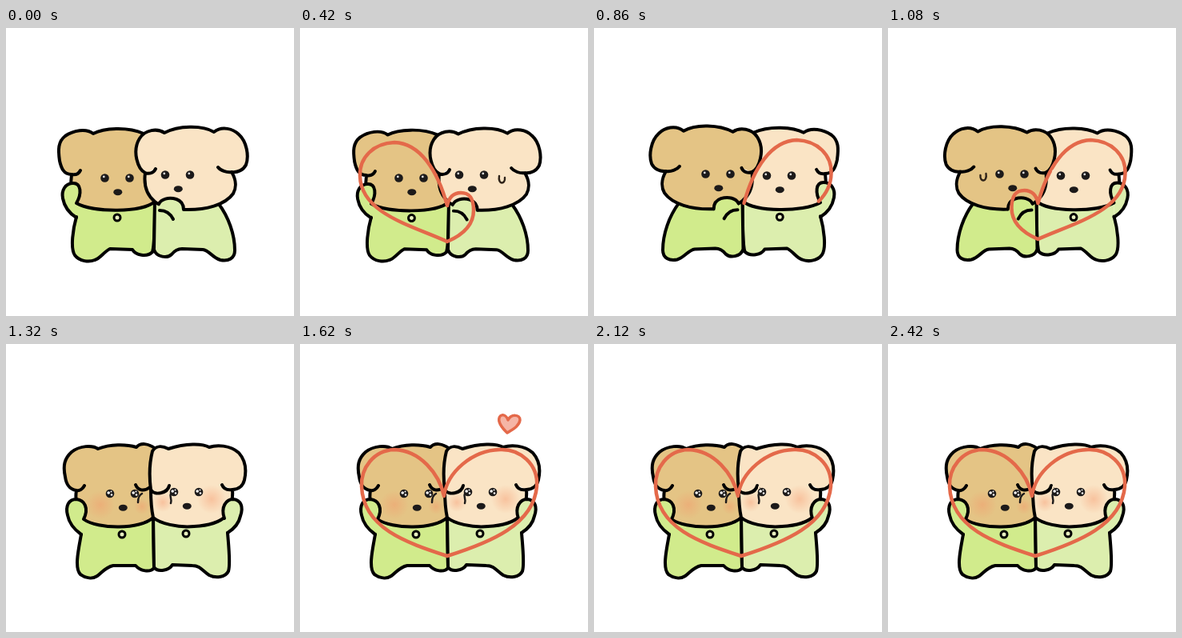
These frames come from a looping animation (360 by 360 pixels, 2520 ms). An HTML page:

```html
<!DOCTYPE html>
<html lang="en">
<head>
<meta charset="utf-8">
<title>Two puppies and a heart</title>
<style>
html, body { margin: 0; width: 100%; height: 100%; overflow: hidden; background: #fff; }
svg { display: block; width: 100vw; height: 100vh; }
</style>
</head>
<body>
<svg viewBox="0 0 360 360">
  <defs>
    <filter id="rough" filterUnits="userSpaceOnUse" x="0" y="0" width="360" height="360" color-interpolation-filters="sRGB">
      <feTurbulence id="noise" type="fractalNoise" baseFrequency=".07" numOctaves="1" seed="1"/>
      <feDisplacementMap in="SourceGraphic" scale="1.5" xChannelSelector="R" yChannelSelector="G"/>
    </filter>
    <radialGradient id="blush">
      <stop offset="0" stop-color="#f59468" stop-opacity=".42"/>
      <stop offset="1" stop-color="#f59468" stop-opacity="0"/>
    </radialGradient>
  </defs>
  <g id="scene" filter="url(#rough)" stroke-linecap="round" stroke-linejoin="round"></g>
</svg>
<script>
const scene = document.getElementById('scene');
const noise = document.getElementById('noise');
const RED = '#e4694a';
const brown = { fur: '#e4c485', suit: '#d1eb8c' };
const cream = { fur: '#fae4c5', suit: '#dceeae' };

// Step lengths in ms, one list per pose
const poses = [
  [100, 120, 100, 100, 120, 120],
  [100, 100, 100, 120, 120],
  [100, 100, 100, 120, ...Array(9).fill(100)]
];
const LOOP = poses.flat().reduce((a, b) => a + b);

const path = (d, fill = 'none', stroke = '#000', width = 4) =>
  `<path d="${d}" fill="${fill}" stroke="${stroke}" stroke-width="${width}"/>`;
const dot = (x, y, r, fill) => `<circle cx="${x}" cy="${y}" r="${r}" fill="${fill}"/>`;
const button = (x, y) => `<circle cx="${x}" cy="${y}" r="4" fill="#e8f0c0" stroke="#000" stroke-width="3"/>`;
const blush = (x, y, r) => dot(x, y, r, 'url(#blush)');
const drawn = step => Math.min(1, Math.max(0, (step - 1) / 2));

function face(x, y, shiny) {
  const eye = ex => dot(ex, y, 5.3, '#1c1a1a') + (shiny
    ? dot(ex - 1.8, y - 1, 1.8, '#fff') + dot(ex + 2, y + 1.5, 1.3, '#fff') + dot(ex + 1.5, y - 2.4, 1, '#fff')
    : dot(ex - 1.2, y - 1.6, 1.4, '#ddd'));
  return eye(x - 15.5) + eye(x + 15.5) +
    `<ellipse cx="${x + .8}" cy="${y + 17.7}" rx="5.5" ry="4" fill="#1c1a1a"/>`;
}

function heart(d, part) {
  return part ? `<path d="${d}" pathLength="1" stroke-dasharray="${part} 2" fill="none" stroke="${RED}" stroke-width="4.5"/>` : '';
}

// One dog waves behind, the other holds a paw to its chin in front
function huddle(back, front, step) {
  const s = 1 - Math.min(step, 4) * .0025;
  return `<g transform="translate(185 292) scale(${s}) translate(-185 -292)">` +
    path('M88 236C84 250 80 275 86 284C92 292 104 293 111 290C118 288 122 280 130 276L158 277C162 284 176 287 183 280C186 270 186 240 186 215L88 215', back.suit) +
    path('M186 217C170 231 110 231 88 219C82 210 80 195 82 183C72 183 69 175 67 166C65 152 65 142 74 135C84 128 100 125 109 132C122 125 152 123 172 132M82 183C87 184 91 182 93 178', back.fur) +
    path('M88 219C95 207 94 194 84 194C74 194 69 203 71 213C73 224 80 232 88 237', back.suit) +
    button(139, 237) +
    path('M186 215L185 277C188 287 202 288 207 283C211 278 215 276 220 276L246 277C254 278 258 287 268 290C278 292 286 288 286 278C286 258 278 236 266 220', front.suit) +
    path('M186 217C175 208 172 196 174 181C165 177 157 154 167 138C174 127 189 125 198 131C215 122 245 121 260 130C270 122 284 126 291 133C301 142 304 160 300 171C297 177 290 181 282 180C288 190 288 200 284 207C274 221 250 228 222 227C205 226 192 222 186 217ZM174 181C179 183 185 181 187 176M282 180C276 181 268 178 265 174', front.fur) +
    path('M191 220C194 214 203 211 213 214C220 216 223 222 222 229L205 234L192 226Z', front.suit, 'none') +
    path('M191 220C194 214 203 211 213 214C219 216 222 221 222 227M192 228C200 228 206 233 209 239') +
    '</g>';
}

function lopsided(step) {
  return (step > 2 ? path('M249 185C247 196 257 196 256 187', 'none', '#2e2218', 2.4) : '') +
    heart('M184 222C172 178 150 144 118 143C92 144 74 162 75 185C76 232 140 247 184 267C205 258 217 245 217 228C217 210 210 206 201 206C192 206 186 212 184 222', drawn(step));
}

function bothWave(step) {
  const rise = Math.max(4 - step, -1) * 10;
  return path('M94 238C91 255 85 280 93 288C100 293 108 294 114 290C120 286 124 279 134 277L162 277C168 284 180 286 185 280L184 215L94 215', brown.suit) +
    path('M277 236C278 250 281 275 278 284C274 292 262 293 254 289C246 284 243 277 233 277L208 276C204 283 190 286 185 279L184 215L274 215', cream.suit) +
    path('M184 217C168 232 115 232 97 219C89 210 86 195 88 183C79 182 75 174 74 166C71 152 73 143 82 135C92 127 108 126 115 131C130 125 150 125 163 129C168 123 178 124 187 131M88 183C92 184 96 181 98 177', brown.fur) +
    path('M162 176C165 183 172 185 180 179') +
    path('M184 217C192 224 215 230 235 228C255 227 268 222 275 215C281 208 284 195 283 182C290 182 296 178 298 170C301 157 299 145 291 136C280 126 263 126 254 129C245 124 225 124 203 131C195 127 187 127 183 134C179 150 179 167 181 182C181 196 182 208 184 217ZM181 182C185 190 202 187 204 177M283 182C277 183 272 181 270 176', cream.fur) +
    blush(118, 201, 18) + blush(170, 203, 10) + blush(196, 198, 12) + blush(257, 194, 18) +
    path('M97 219C104 205 98 195 88 194C78 194 74 203 77 214C79 225 87 233 94 238', brown.suit) +
    path('M273 218C268 204 275 194 284 194C294 195 297 204 293 215C291 225 285 231 277 236', cream.suit) +
    button(145, 238) + button(225, 237) +
    path('M170 187C166 189 165 193 165 198M206 187C204 191 208 194 206 199', 'none', '#1c1a1a', 2.5) +
    face(145.5, 187, true) + face(225.5, 185, true) +
    heart('M180 190C174 162 150 133 118 132C92 133 76 155 77 178C79 230 132 248 184 265C238 248 292 226 296 178C298 150 275 131 250 132C215 133 184 160 180 190', drawn(step)) +
    (step > 2 && step < 7 ? `<g transform="translate(0 ${rise})">` +
      path('M260 95C257 86 247 87 249 97C251 104 256 108 259 111C265 107 274 103 275 95C275 88 264 87 260 95Z', '#f5b5a6', RED, 3.5) + '</g>' : '');
}

const mirror = (art, stretch, dy) => `<g transform="matrix(-1 0 0 ${stretch} 371.5 ${dy})">${art}</g>`;

const draw = [
  step => huddle(brown, cream, step) + face(139, 187.5) + face(214.5, 183.5) + lopsided(step),
  step => mirror(huddle(cream, brown, step), 1.01, -3.4) + face(155, 182.5) + face(231.5, 184.5) + mirror(lopsided(step), 1, -3),
  bothWave
];

let shown = '';
function render(t) {
  let pose = 0, step = 0;
  while (t >= poses[pose][step]) {
    t -= poses[pose][step++];
    if (step === poses[pose].length) { pose = (pose + 1) % 3; step = 0; }
  }
  const key = pose + '-' + step;
  if (key === shown) return;
  shown = key;
  noise.setAttribute('seed', 1 + (pose + step) % 3);
  scene.innerHTML = draw[pose](step);
}

let start;
function loop(now) {
  start ??= now;
  render((now - start) % LOOP);
  requestAnimationFrame(loop);
}
render(0);
requestAnimationFrame(loop);
</script>
</body>
</html>
```
